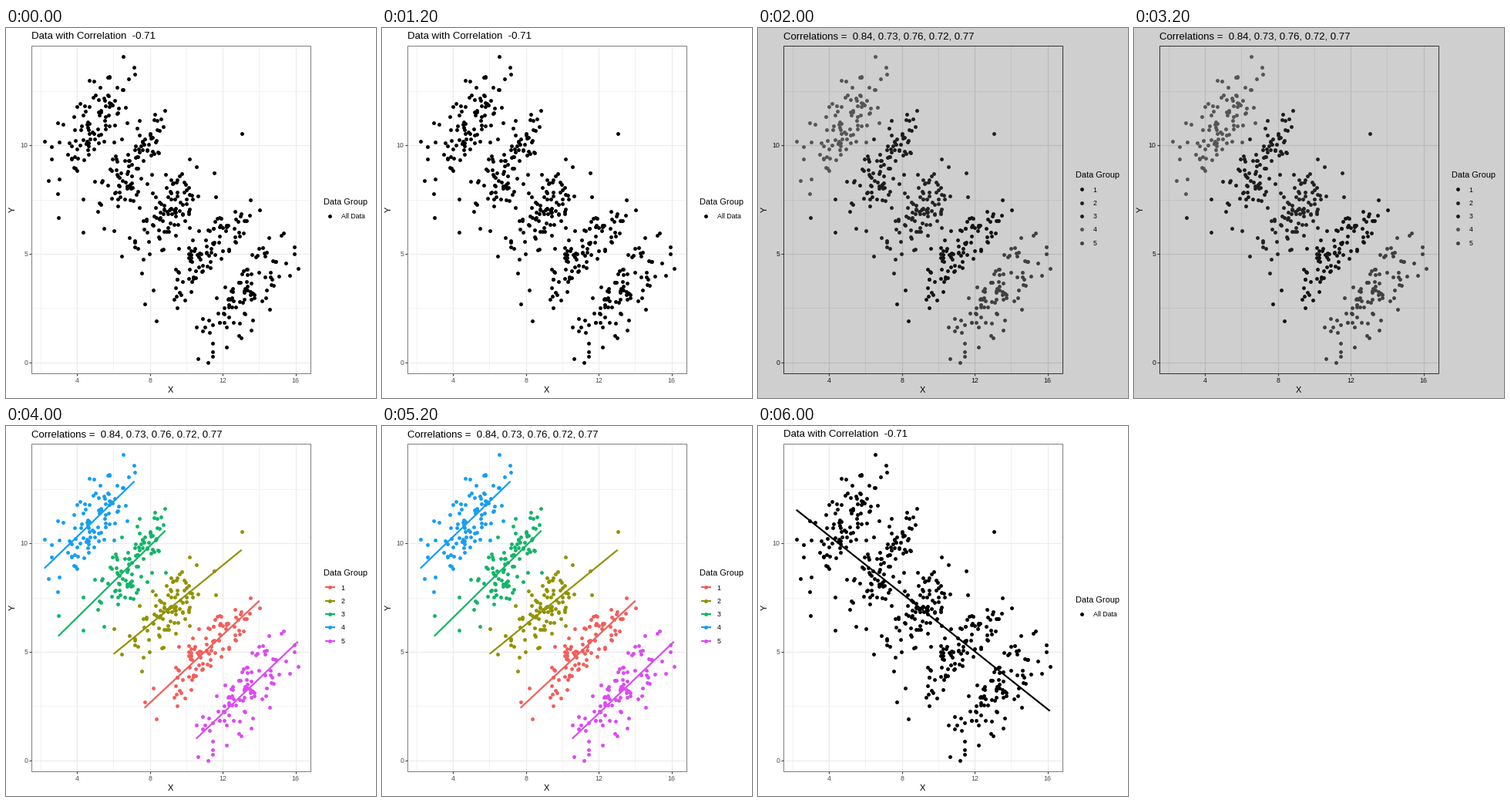
A matplotlib script that plays this animation: 480x480 px, repeating every 8000 ms.

```python
import numpy as np
import matplotlib.pyplot as plt
from matplotlib.animation import FuncAnimation

SIZE, DPI = 480, 96
PT = 72 / DPI  # points per pixel
LEFT, RIGHT, TOP, BOTTOM = 33.5, 395.5, 23.5, 448.3

plt.rcParams["font.family"] = "Liberation Sans"
fig = plt.figure(figsize=(SIZE / DPI, SIZE / DPI), dpi=DPI)
ax = fig.add_axes([0, 0, 1, 1])

COLORS = ["#f15f5b", "#909300", "#12b567", "#169ef2", "#da4cf0"]
GREYS = ["#131313", "#222222", "#1c1c1c", "#555555", "#404040"]

# Correlation, ends of the fit line (x0, y0, x1, y1), centre and spread along x
GROUPS = [
    (0.84, (180, 366, 329, 227), 259, 29),
    (0.73, (140, 296, 306, 161), 213, 28),
    (0.76, (68, 273, 207, 136), 166, 27),
    (0.72, (50, 185, 167, 72), 114, 27),
    (0.77, (247, 406, 379, 280), 313, 30),
]


def make_cloud(seed, group, count=100):
    """Random points whose regression line is the group's fit line."""
    r, (x0, y0, x1, y1), centre, spread = group
    rng = np.random.default_rng(seed)
    x = rng.normal(centre, spread, count * 4)
    x = x[(x > x0) & (x < x1)][:count]
    x[:2] = x0, x1
    noise = rng.normal(size=count * 4)
    noise = noise[np.abs(noise) < 2.1][:count]
    noise -= np.polyval(np.polyfit(x, noise, 1), x)
    slope = (y1 - y0) / (x1 - x0)
    scatter = abs(slope) * spread * np.sqrt(1 / r**2 - 1)
    y = y0 + slope * (x - x0) + scatter * noise / noise.std()
    return np.column_stack([x, y])


CLOUDS = [make_cloud(seed, group) for seed, group in enumerate(GROUPS)]


def px(x):
    return -2 + 23.625 * x


def py(y):
    return 434 - 28.15 * y


def line(x0, y0, x1, y1, color, width, z=1):
    ax.plot([x0, x1], [y0, y1], color=color, lw=width * PT, zorder=z,
            solid_capstyle="butt")


def dots(points, color):
    x, y = np.transpose(points)
    ax.scatter(x, y, s=(4.9 * PT) ** 2, color=color, linewidths=0, zorder=3)


def text(x, y, label, size, color="black", **kw):
    ax.text(x, y, label, fontsize=size * PT, color=color, va="baseline", **kw)


def draw_panel(grey):
    grid = "#b9b9b9" if grey else "#ebebeb"
    tick_text = "#111111" if grey else "#4d4d4d"
    border = "#333333" if grey else "#7f7f7f"
    for x in (2, 6, 10, 14):
        line(px(x), TOP, px(x), BOTTOM, grid, 0.6)
    for y in (2.5, 7.5, 12.5):
        line(LEFT, py(y), RIGHT, py(y), grid, 0.6)
    for x in (4, 8, 12, 16):
        line(px(x), TOP, px(x), BOTTOM, grid, 1.1)
        line(px(x), BOTTOM, px(x), BOTTOM + 3, "#333333", 1.1)
        text(px(x), 460, str(x), 8.8, tick_text, ha="center")
    for y in (0, 5, 10):
        line(LEFT, py(y), RIGHT, py(y), grid, 1.1)
        line(LEFT - 3, py(y), LEFT, py(y), "#333333", 1.1)
        text(28.5, py(y) + 3.3, str(y), 8.8, tick_text, ha="right")
    ax.add_patch(plt.Rectangle((LEFT, TOP), RIGHT - LEFT, BOTTOM - TOP, fill=False,
                               ec=border, lw=PT, zorder=5))
    text(214, 473, "X", 11, ha="center")
    ax.text(9.5, 236, "Y", fontsize=11 * PT, rotation=90, ha="center", va="center")


def draw_all_data(with_fit):
    text(33, 14.7, "Data with Correlation  -0.71", 13.2)
    dots(np.vstack(CLOUDS), "black")
    if with_fit:
        line(50, 109, 379, 370, "black", 2.2, 4)
    text(412, 229, "Data Group", 11)
    dots([(420.7, 244)], "black")
    text(435, 247.2, "All Data", 8.8)


def draw_groups(colors, with_fit):
    values = ", ".join(f"{group[0]:.2f}" for group in GROUPS)
    text(33, 14.7, f"Correlations =  {values}", 13.2)
    text(412, 194, "Data Group", 11)
    for k, color in enumerate(colors):
        y = 209.7 + 17.28 * k
        dots(CLOUDS[k], color)
        dots([(420.7, y)], color)
        text(435, y + 3.2, str(k + 1), 8.8)
        if with_fit:
            line(*GROUPS[k][1], color, 2.2, 4)
            line(414, y, 427.5, y, color, 2.2, 4)


def draw(step):
    ax.clear()
    ax.set(xlim=(0.3, SIZE + 0.3), ylim=(SIZE + 0.3, 0.3))
    ax.axis("off")
    grey = step == 1
    fig.set_facecolor("#cfcfcf" if grey else "white")
    draw_panel(grey)
    if step in (0, 3):
        draw_all_data(with_fit=step == 3)
    else:
        draw_groups(GREYS if grey else COLORS, with_fit=not grey)
    return []


anim = FuncAnimation(fig, draw, frames=4, interval=2000, repeat=True,
                     repeat_delay=0, init_func=lambda: draw(0))
plt.show()
```
